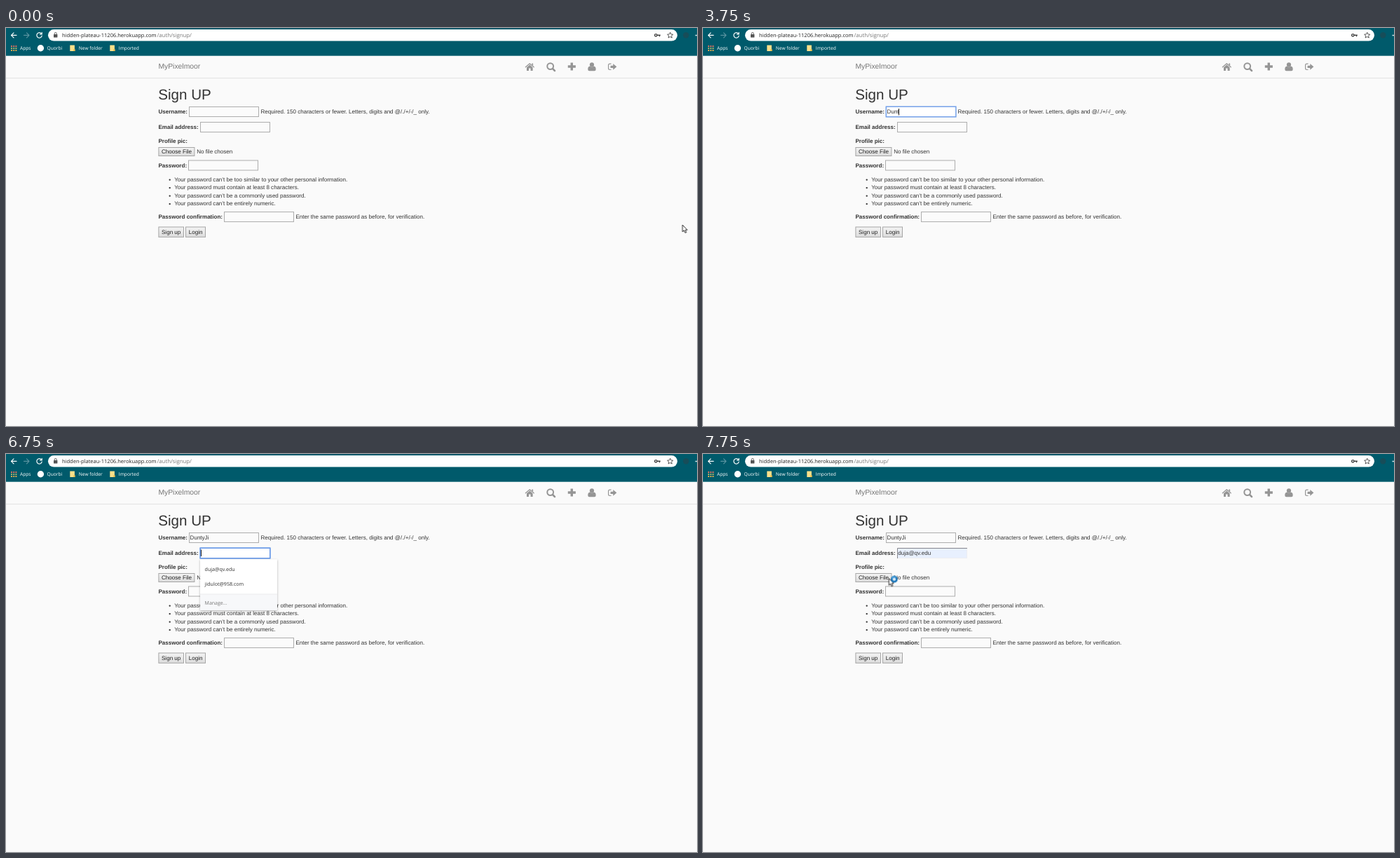
These frames come from a looping animation (986x568 px, 8 s). An HTML page:

```html
<!DOCTYPE html>
<html lang="en">
<head>
<meta charset="utf-8">
<title>Sign UP</title>
<style>
html, body { margin: 0; width: 100%; height: 100%; overflow: hidden; background: #fafafa; }
svg { display: block; width: 986px; height: 568px; }
text { font: 8.05px "Liberation Sans", Arial, sans-serif; fill: #333; text-rendering: geometricPrecision; white-space: pre; }
.b { font-weight: 700; }
.ui text, text.ui { font-family: "Open Sans", "Noto Sans", sans-serif; }
.marks text { font-size: 6.65px; fill: #fff; }
.field rect { fill: #fbfbfb; stroke: #adadad; }
.btn rect { fill: url(#face); stroke: #a6a6a6; }
.btn text { fill: #222; }
.focus { fill: #fff; stroke: #6b9be8; stroke-width: 1.4; }
.line { fill: none; stroke-linecap: round; stroke-linejoin: round; }

/* Everything changes in hard steps on one 8 s clock */
.a { animation: 8s step-end infinite; }
.user-on { animation-name: user-on; }
.typed { animation-name: typed; }
.type { animation-name: type; }
.blink { animation-name: blink; }
.mail-on { animation-name: mail-on; }
.mail-caret { animation-name: mail-caret; }
.mail-fill { animation-name: mail-fill; }
.hint { animation-name: hint; }
.picked { animation-name: picked; }
.list { animation-name: list; }
.left { animation-name: left; }
.mouse { animation-name: mouse; }

@keyframes user-on { 0% { opacity: 0 } 18.75% { opacity: 1 } 84.375% { opacity: 0 } }
@keyframes typed { 0% { opacity: 0 } 37.5% { opacity: 1 } }
@keyframes type {
  0% { transform: translateX(262px) }
  37.5% { transform: translateX(268px) }
  40.625% { transform: translateX(277px) }
  46.875% { transform: translateX(279px) }
  53.125% { transform: translateX(283px) }
  62.5% { transform: translateX(288px) }
  71.875% { transform: translateX(290px) }
}
@keyframes blink {
  0%, 25%, 59.375%, 68.75%, 78.125% { opacity: 0 }
  18.75%, 31.25%, 62.5%, 71.875% { opacity: 1 }
}
@keyframes mail-on { 0% { opacity: 0 } 84.375% { opacity: 1 } 96.875% { opacity: 0 } }
@keyframes mail-caret { 0% { opacity: 0 } 84.375% { opacity: 1 } 90.625% { opacity: 0 } }
@keyframes mail-fill { 0% { opacity: 0 } 87.5% { opacity: 1 } }
@keyframes hint { 0% { opacity: 0 } 87.5% { opacity: 1 } 90.625% { opacity: 0 } }
@keyframes picked { 0% { opacity: 0 } 90.625% { opacity: 1 } }
@keyframes list { 0% { opacity: 0 } 84.375% { opacity: 1 } 90.625% { opacity: 0 } }
@keyframes left { 0% { opacity: 0 } 96.875% { opacity: 1 } }
@keyframes mouse {
  0% { opacity: 1; transform: translate(965.3px, 281px) }
  3.125% { opacity: 1; transform: translate(675px, 234px) }
  6.25% { opacity: 1; transform: translate(289px, 97px) }
  9.375% { opacity: 0; transform: translate(289px, 97px) }
  87.5% { opacity: 1; transform: translate(315.5px, 166px) }
  93.75% { opacity: 1; transform: translate(265.3px, 177.5px) }
}
</style>
</head>
<body>
<svg viewBox="0 0 986 568">
  <defs>
    <linearGradient id="face" x2="0" y2="1">
      <stop stop-color="#f4f4f4"/><stop offset="1" stop-color="#dcdcdc"/>
    </linearGradient>
    <filter id="shade" x="-10%" y="-10%" width="120%" height="125%">
      <feDropShadow dx="0" dy="1" stdDeviation="1.6" flood-opacity=".3"/>
    </filter>
  </defs>
  <rect width="986" height="568" fill="#fafafa"/>

  <!-- Browser bar -->
  <rect width="986" height="39.7" fill="#005a6b"/>
  <rect x="60" y="2" width="898" height="16.6" rx="8.3" fill="#fff"/>
  <g class="line" stroke="#fff" stroke-width="1.2">
    <path d="M15 10.3H7.6M11 6.8L7.5 10.3L11 13.8"/>
    <path d="M25.5 10.3H33M29.5 6.8L33 10.3L29.5 13.8" stroke="#5a93a0"/>
    <path d="M50.6 8.2A3.7 3.7 0 1 0 51.2 11.2M51.2 6.4V8.9H48.6"/>
  </g>
  <rect x="68" y="9" width="5.4" height="4.6" rx=".6" fill="#555"/>
  <path d="M69.2 9V7.9a1.5 1.5 0 0 1 3 0V9" class="line" stroke="#555" stroke-width=".9"/>
  <g class="ui">
    <text x="80" y="13" style="font-size:7.53px;fill:#222">hidden-plateau-11206.herokuapp.com</text>
    <text x="215.4" y="13" style="font-size:7.8px;fill:#777">/auth/signup/</text>
  </g>
  <g fill="none" stroke="#444">
    <circle cx="927.3" cy="10.3" r="1.7" stroke-width="1.4"/>
    <path d="M929 10.3H933.8M932.5 10.3V12.2" stroke-width="1.4"/>
    <path d="M947.7 6.2l1.2 2.7 2.9.3-2.2 1.9.7 2.9-2.6-1.5-2.6 1.5.7-2.9-2.2-1.9 2.9-.3z" stroke-width=".9"/>
  </g>
  <circle cx="970.3" cy="10.3" r="4.2" fill="#174d59"/>
  <path d="M983.5 10.5H986" stroke="#cfe3e7" stroke-width="1.5"/>
  <g class="ui marks">
    <g stroke-width="2" stroke-dasharray="2 1.2">
      <path d="M7 26H15.4" stroke="#d9705f"/>
      <path d="M7 29H15.4" stroke="#a3b06a"/>
      <path d="M7 32H15.4" stroke="#d9a64e"/>
    </g>
    <text x="20" y="31.3">Apps</text>
    <circle cx="49.4" cy="28.7" r="4.7" fill="#fff"/>
    <text x="58.5" y="31.3">Quorbi</text>
    <path d="M91.3 24.6h6.6v8.3h-6.6zM148.3 24.6h6.6v8.3h-6.6z" fill="#fbe08a"/>
    <path d="M96.3 30.2h2.4v2.7h-2.4zM153.3 30.2h2.4v2.7h-2.4z" fill="#e8bd4c"/>
    <text x="103.8" y="31.3">New folder</text>
    <text x="160.8" y="31.3">Imported</text>
  </g>

  <!-- Page header -->
  <path d="M0 71.5H986" stroke="#e2e2e2"/>
  <text x="217.4" y="57.6" style="font-size:10.36px;fill:#777">MyPixelmoor</text>
  <g fill="#959595">
    <path d="M743 56.2L747.3 52.6L751.6 56.2V61H748.6V57.6H746V61H743z"/>
    <path d="M750.3 50.6h1.8v3.2l-1.8-1.5z"/>
    <path d="M741.4 55.8L747.3 50.8L753.2 55.8" class="line" stroke="#959595" stroke-width="1.3"/>
    <g fill="none" stroke="#959595" stroke-width="2">
      <circle cx="776.7" cy="54.6" r="4.4"/>
      <path d="M780 58L783 61" stroke-width="2.5" stroke-linecap="round"/>
    </g>
    <path d="M805.6 49.6h3.4v3.7h3.9v3.4H809v3.9h-3.4v-3.9h-3.8v-3.4h3.8z"/>
    <circle cx="836" cy="52.4" r="3.1"/>
    <path d="M833.2 54.6q2.8 2 5.6 0q2.9.5 2.9 4.3q0 2.4-2 2.4h-7.4q-2 0-2-2.4q0-3.8 2.9-4.3z"/>
    <path d="M863.6 51.1H861.5q-1.9 0-1.9 1.9V57.6q0 1.9 1.9 1.9H863.6" fill="none" stroke="#959595" stroke-width="1.2"/>
    <path d="M862.6 53.7H866.3V50.9L871.4 55.3L866.3 59.7V56.9H862.6z"/>
  </g>

  <!-- Form -->
  <text x="217.3" y="102.2" style="font-size:20.6px">Sign UP</text>
  <g class="b">
    <text class="b" x="217.4" y="122.3">Username:</text>
    <text class="b" x="217.4" y="144.2">Email address:</text>
    <text class="b" x="217.4" y="164.2">Profile pic:</text>
    <text class="b" x="217.4" y="198.8">Password:</text>
    <text class="b" x="217.4" y="272.2">Password confirmation:</text>
  </g>
  <text x="363.4" y="122.3">Required. 150 characters or fewer. Letters, digits and @/./+/-/_ only.</text>
  <text x="272.3" y="179.2">No file chosen</text>
  <text x="413.4" y="272.2">Enter the same password as before, for verification.</text>
  <text x="240.2" y="218.8">Your password can’t be too similar to your other personal information.</text>
  <text x="240.2" y="230.4">Your password must contain at least 8 characters.</text>
  <text x="240.2" y="241.9">Your password can’t be a commonly used password.</text>
  <text x="240.2" y="253.4">Your password can’t be entirely numeric.</text>
  <path d="M233.7 216.6h0M233.7 228.1h0M233.7 239.6h0M233.7 251.1h0" stroke="#333" stroke-width="2.4" stroke-linecap="round"/>
  <g class="field">
    <rect x="261.5" y="112.5" width="99" height="14"/>
    <rect x="277.5" y="134.5" width="99" height="14"/>
    <rect x="260.5" y="189" width="99" height="14"/>
    <rect x="311.5" y="262.5" width="99" height="14"/>
  </g>
  <g class="btn">
    <rect x="217.9" y="170.5" width="51" height="12"/>
    <text x="222" y="179.2">Choose File</text>
    <rect x="217.9" y="284" width="35.6" height="14.3"/>
    <text x="222" y="294.1">Sign up</text>
    <rect x="256.5" y="284" width="28" height="14.3"/>
    <text x="260.8" y="294.1">Login</text>
  </g>

  <!-- User name: a cover slides right to reveal each letter -->
  <rect class="focus a user-on" x="261.3" y="112.2" width="99.6" height="14.6"/>
  <text class="a typed" x="262.6" y="122.3">DuntyJi</text>
  <g class="a user-on">
    <g class="a type">
      <rect y="113.5" width="30" height="12" fill="#fff"/>
      <rect class="a blink" y="115" width="1" height="9.5" fill="#222"/>
    </g>
  </g>

  <!-- Email -->
  <rect class="focus a mail-on" x="277.2" y="134.2" width="99.6" height="14.6"/>
  <rect class="a mail-fill" x="277" y="134" width="100" height="15" fill="#e8f0fe"/>
  <g class="a left" fill="none">
    <path d="M376.5 134.5V148.5H277.5" stroke="#eceef2"/>
    <path d="M277.5 149V134.5H377" stroke="#85858b"/>
  </g>
  <rect class="a mail-on" x="277.2" y="134.2" width="99.6" height="14.6" fill="none" stroke="#6b9be8" stroke-width="1.4"/>
  <text class="ui a hint" x="278.3" y="144.2" style="font-size:7.1px">duja@qv.edu</text>
  <text class="a picked" x="278.2" y="144.2">duja@qv.edu</text>
  <rect class="a mail-caret" x="278" y="136.5" width="1" height="9.5" fill="#222"/>

  <!-- Suggestions -->
  <g class="ui a list">
    <rect x="277" y="150.5" width="110" height="72.5" fill="#fff" filter="url(#shade)"/>
    <rect class="a hint" x="277" y="154" width="110" height="20.8" fill="#dadbdf"/>
    <rect x="277" y="200" width="110" height="23" fill="#f7f8fa"/>
    <path d="M277 200H387" stroke="#e6e7ea" stroke-width=".8"/>
    <g style="font-weight:500">
      <text x="283.6" y="167.1" style="font-size:7.1px;font-weight:500">duja@qv.edu</text>
      <text x="283.6" y="187.8" style="font-size:7.1px;font-weight:500">jidulot@958.com</text>
    </g>
    <text x="283.6" y="215" style="font-size:7px;fill:#777">Manage...</text>
  </g>

  <!-- Pointer -->
  <g class="a mouse">
    <path d="M0 0V9.8L2.2 7.8L3.9 11.4L5.6 10.6L4 7.2H6.9Z" fill="#fff" stroke="#111" stroke-width=".9"/>
    <g class="a left">
      <circle cx="7.6" cy="1.2" r="3.6" fill="#d8ecfa" stroke="#1673b8" stroke-width="2.6"/>
      <path d="M4.6 -.6A3.6 3.6 0 0 1 9.6 -1.8" class="line" stroke="#5cb4ee" stroke-width="1.2"/>
    </g>
  </g>
</svg>
</body>
</html>
```
